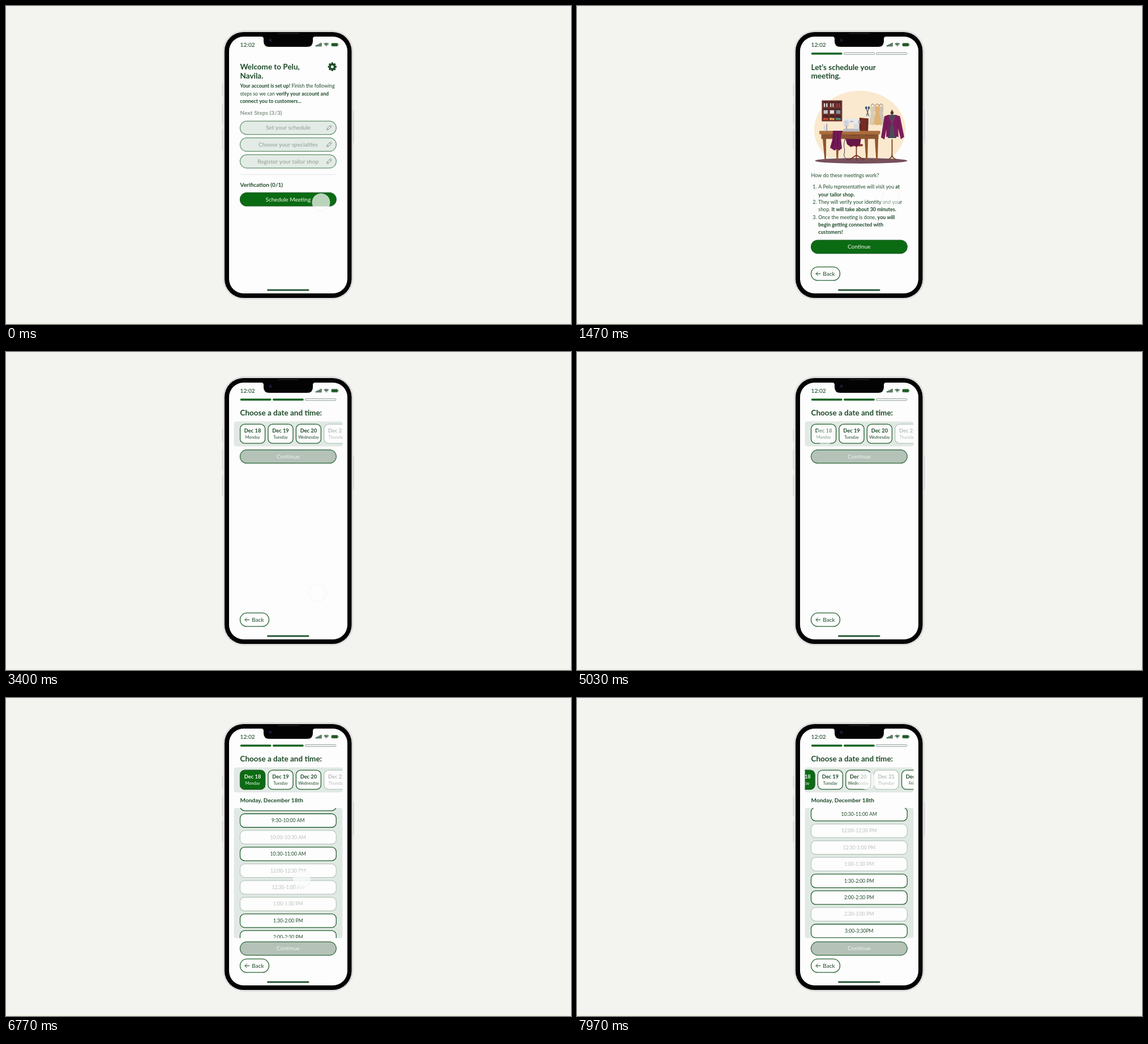
An HTML page with a canvas for the animation above (8000 ms loop, 998 by 561 pixels).

```html
<!DOCTYPE html>
<html lang="en">
<head>
<meta charset="utf-8">
<title>Meeting scheduler</title>
<style>
html, body { margin: 0; width: 100%; height: 100%; overflow: hidden; background: #f3f3f0; }
canvas { display: block; width: 998px; height: 561px; }
</style>
</head>
<body>
<canvas id="stage"></canvas>
<script>
const W = 998, H = 561, LOOP = 8000;
const canvas = document.getElementById('stage');
const ctx = canvas.getContext('2d');
const dpr = window.devicePixelRatio || 1;
canvas.width = W * dpr;
canvas.height = H * dpr;

const INK = '#1d4a28', GREEN = '#0b6b12', EDGE = '#24602f', PANEL = '#e1e9e4', WHITE = '#fdfdfd';
const SCREEN = { x: 394, y: 54, w: 209, h: 453 };

// ---------- timing ----------
const clamp = v => Math.min(1, Math.max(0, v));
const mix = (a, b, p) => a + (b - a) * p;

// cubic-bezier(.42, 0, .58, 1)
function easeInOut(x) {
  if (x <= 0 || x >= 1) return clamp(x);
  let lo = 0, hi = 1, u = 0.5;
  for (let i = 0; i < 20; i++) {
    u = (lo + hi) / 2;
    const bx = 1.26 * u * (1 - u) ** 2 + 1.74 * u * u * (1 - u) + u ** 3;
    if (bx < x) lo = u; else hi = u;
  }
  return u * u * (3 - 2 * u);
}
const phase = (t, from, to) => easeInOut((t - from) / (to - from));

// ---------- drawing helpers ----------
function box(x, y, w, h, r, fill, stroke, line = 1.2) {
  ctx.beginPath();
  ctx.roundRect(x, y, w, h, r);
  if (fill) { ctx.fillStyle = fill; ctx.fill(); }
  if (stroke) { ctx.strokeStyle = stroke; ctx.lineWidth = line; ctx.stroke(); }
}
function oval(x, y, rx, ry, fill) {
  ctx.beginPath();
  ctx.ellipse(x, y, rx, ry, 0, 0, Math.PI * 2);
  ctx.fillStyle = fill;
  ctx.fill();
}
function poly(points, fill) {
  ctx.beginPath();
  for (let i = 0; i < points.length; i += 2) ctx.lineTo(points[i], points[i + 1]);
  ctx.closePath();
  ctx.fillStyle = fill;
  ctx.fill();
}
function stroke(path, color, width) {
  ctx.strokeStyle = color;
  ctx.lineWidth = width;
  ctx.lineCap = ctx.lineJoin = 'round';
  ctx.stroke(new Path2D(path));
}
function faded(alpha, draw) {
  if (alpha <= 0) return;
  ctx.save();
  ctx.globalAlpha *= alpha;
  draw();
  ctx.restore();
}
// y is the optical middle of the line
function text(str, x, y, size, { weight = 400, color = INK, align = 'left' } = {}) {
  ctx.font = `${weight} ${size}px Lato, sans-serif`;
  ctx.textAlign = align;
  ctx.fillStyle = color;
  ctx.fillText(str, x, y + size * 0.34);
}
// asterisks switch bold on and off
function rich(str, x, y, size) {
  str.split('*').forEach((part, i) => {
    text(part, x, y, size, { weight: i % 2 ? 700 : 400 });
    x += ctx.measureText(part).width;
  });
}
const title = (str, y) => text(str, 413.5, y, 13.5, { weight: 700 });
const centered = (str, x, y, size, color, weight = 400) =>
  text(str, x, y, size, { color, weight, align: 'center' });

function button(label, y, kind) {
  const [fill, edge, color] = {
    solid: [GREEN, EDGE, '#f2f7f2'],
    done: ['#e3ebe6', '#5f8f69', '#8b9f91'],
    off: ['#b4c2b8', '#2b6537', '#eef2ef']
  }[kind];
  box(413.5, y - 11.8, 169.8, 23.6, 11.8, fill, edge);
  centered(label, 498.3, y, 10.1, color);
}
function statusBar() {
  text('12:02', 413.5, 68.6, 10.2, { weight: 500 });
  for (let i = 0; i < 4; i++) {
    const h = 2.5 + i * 1.4;
    box(547 + i * 2.8, 71.6 - h, 2, h, 0.5, INK);
  }
  for (let i = 0; i < 3; i++) {
    ctx.beginPath();
    ctx.arc(565.7, 71.2, 0.8 + i * 2.4, -Math.PI * 0.76, -Math.PI * 0.24);
    ctx.strokeStyle = INK;
    ctx.lineWidth = 1.4;
    ctx.stroke();
  }
  box(574.8, 65.4, 11.4, 5.6, 1.6, '#1d5a22', '#7f9a86', 0.7);
  box(587, 67.2, 1, 2, 0.4, '#7f9a86');
}
function screenBase() {
  ctx.fillStyle = WHITE;
  ctx.fillRect(SCREEN.x, SCREEN.y, SCREEN.w, SCREEN.h);
  statusBar();
  box(461, 499.8, 74.5, 2.6, 1.3, '#1d4f2d');
}
function progress(done) {
  for (let i = 0; i < 3; i++) {
    const x = 413.7 + i * 57.2;
    if (i < done) box(x, 82.2, 55, 3.6, 1.8, '#126220');
    else box(x + 0.2, 82.4, 54.6, 3.2, 1.6, WHITE, '#71867a', 0.8);
  }
}
function backButton() {
  box(413.5, 460.4, 51, 23.8, 11.9, WHITE, EDGE, 1.3);
  stroke('M430 472.4H422.2M425.4 469L422 472.4L425.4 475.8', INK, 1);
  text('Back', 434.3, 472.4, 10);
}
function pencil(y) {
  ctx.save();
  ctx.translate(570.5, y);
  ctx.rotate(Math.PI / 4);
  box(-1.6, -5.4, 3.2, 8, 0.8, null, '#7f9787', 0.9);
  stroke('M-1.6 2.6L0 5.4L1.6 2.6M-1.6 -3.2H1.6', '#7f9787', 0.9);
  ctx.restore();
}
function gear(x, y) {
  ctx.save();
  ctx.translate(x, y);
  for (let i = 0; i < 8; i++) {
    box(-1.8, -7.6, 3.6, 4, 0.8, INK);
    ctx.rotate(Math.PI / 4);
  }
  oval(0, 0, 5.7, 5.7, INK);
  oval(0, 0, 2.5, 2.5, WHITE);
  ctx.restore();
}

// ---------- screens ----------
function homeScreen() {
  screenBase();
  title('Welcome to Pelu,', 107.8);
  title('Navila.', 123);
  gear(576.3, 107.2);
  rich('*Your account is set up!* Finish the following', 413.5, 141.2, 8.9);
  rich('steps so we can *verify your account and*', 413.5, 154.6, 8.9);
  rich('*connect you to customers...*', 413.5, 168, 8.9);
  text('Next Steps (3/3)', 413.5, 188.4, 10.2, { weight: 700, color: '#84988a' });
  ['Set your schedule', 'Choose your specialties', 'Register your tailor shop'].forEach((label, i) => {
    const y = 214.9 + i * 29.6;
    button(label, y, 'done');
    pencil(y);
  });
  box(413.5, 296.8, 170, 0.9, 0, '#dfe5e1');
  text('Verification (0/1)', 413.5, 315.2, 10, { weight: 700 });
  button('Schedule Meeting', 341.2, 'solid');
}

function shelf() {
  box(432.4, 166.4, 36, 37, 0.5, '#71352f');
  const goods = ['#d9d2cc', '#c8b8b0', '#a33b45', '#b9c4cb', '#e0dcd6', '#7d8f9c', '#c94a35', '#d9a348', '#4f8b78'];
  goods.forEach((color, i) => {
    const x = 434.6 + (i % 3) * 11.1, y = 168.6 + Math.floor(i / 3) * 11.8;
    box(x, y, 9.6, 9.6, 0, '#4c2326');
    if (i < 3) {
      box(x + 1.2, y + 3, 2.6, 6.6, 0.5, color);
      box(x + 5.4, y + 3, 2.6, 6.6, 0.5, color);
    } else if (i < 6) box(x + 1, y + 3.4, 7.4, 6.2, 0.5, color);
    else { oval(x + 2.7, y + 7, 2.4, 2.4, color); oval(x + 6.9, y + 7.2, 2.2, 2.2, color); }
  });
}
function dress(x, color) {
  stroke(`M${x - 3.5} 175.5L${x} 172.5L${x + 3.5} 175.5`, '#6b4a3a', 0.9);
  poly([x - 3.5, 174, x, 178, x + 3.5, 174, x + 4.6, 183, x + 3.2, 188, x + 7, 208,
    x, 210.5, x - 6.8, 208, x - 3.2, 188, x - 4.6, 183], color);
}
function sewingMachine() {
  box(470.5, 216.4, 29, 5, 1, '#b9bbc4');
  box(489, 200, 9.5, 17, 2, '#dbdce2');
  box(471, 199, 27.5, 9, 3, '#e8e8ed');
  box(471.5, 202, 8.5, 10.5, 1.5, '#d0d2da');
  box(475.4, 212, 1.2, 4.8, 0, '#70747f');
  oval(498.8, 205, 1.8, 3.2, '#9a9da8');
  box(482, 202.5, 6.5, 2.5, 1, '#b9bbc4');
}
function mannequin() {
  stroke('M556.5 184V189M556.5 236V266M550 270.5Q556 268 556.5 262Q557 268 563 270.5', '#7d4f2b', 2);
  oval(556.5, 188.5, 2.7, 3.3, '#54331f');
  poly([549, 192, 564, 192, 566, 214, 564, 233, 549, 233, 547, 214], '#484b57');
  poly([550, 192, 543, 194.5, 537, 232, 543, 235.5, 546.5, 217, 546, 231, 552.5, 230, 553.5, 212, 556, 207, 551, 194], '#761b58');
  poly([563, 192, 570.5, 194.5, 578, 231, 572, 235, 567, 216, 568, 231, 561, 230, 559.5, 212, 557, 207, 562, 194], '#7d1d5d');
  stroke('M547 203L546.5 218M567 203L567 216', '#571340', 0.8);
  stroke('M551 194L556 207L562 194', '#9a3476', 1);
}
function workshop() {
  ctx.beginPath();
  ctx.ellipse(499.5, 218, 80.6, 68.5, 0, Math.PI * 0.74, Math.PI * 2.26);
  ctx.fillStyle = '#fae9ce';
  ctx.fill();
  oval(502, 273, 81.5, 5, '#76505c');
  shelf();
  dress(537, '#cfc3ae');
  dress(522.5, '#d7cdb4');
  dress(530.5, '#e0b277');
  stroke('M511 181L515.5 194M515 181L511.5 194', '#465572', 1.2);
  oval(510.7, 179.5, 1.8, 2.5, '#31506f');
  oval(515.4, 179.5, 1.8, 2.5, '#31506f');
  // stool behind the table
  poly([499, 197, 515, 198.5, 514, 222, 498, 221], '#762c22');
  stroke('M501 198V220M512 200V220', '#541c18', 1);
  box(482, 243.5, 23, 4, 2, '#8c3426');
  stroke('M493.5 247V263M481 271.5L493.5 263L507 271.5M493.5 263V272', '#7a3424', 1.8);
  poly([474, 233, 502, 233, 500, 244, 494, 249, 489, 245, 484, 249, 477, 244], '#651646');
  // table
  const leg = (x, dx) => poly([x, 234, x + 6, 234, x + 4 + dx, 273, x + 1.5 + dx, 273], '#8f5630');
  leg(434, 2);
  leg(457, 0);
  leg(508, 1);
  leg(526, 1);
  box(431.5, 226, 101, 8.5, 0.5, '#8b5431');
  box(428, 220.3, 107.5, 6, 1, '#aa6d3d');
  stroke('M482 228.5H498M510 228.5H525', '#6d3c20', 0.8);
  box(435.8, 211, 2.6, 9.5, 0.8, '#d5d7df');
  box(440.5, 207.5, 1.4, 13, 0.4, '#7d899d');
  sewingMachine();
  poly([452, 220, 469, 220, 466, 232, 468, 251, 463, 255, 459, 252, 455, 255, 447, 250, 451, 236], '#731a55');
  stroke('M455 224L452 250M461 223L460 250', '#4f0f39', 0.9);
  stroke('M474 234C468 250 475 250 472 260Q470 268 479 271', '#342a35', 0.9);
  mannequin();
}
function meetingScreen() {
  screenBase();
  progress(1);
  title('Let’s schedule your', 108.2);
  title('meeting.', 123.6);
  workshop();
  text('How do these meetings work?', 413.5, 299.2, 9);
  [
    'A Pelu representative will visit you *at*',
    '*your tailor shop.*',
    'They will verify your identity and your',
    'shop. *It will take about 30 minutes.*',
    'Once the meeting is done, *you will*',
    '*begin getting connected with*',
    '*customers!*'
  ].forEach((line, i) => rich(line, 426.3, 319.2 + i * 13.36, 8.9));
  [0, 2, 4].forEach((row, i) => text(`${i + 1}.`, 416.3, 319.2 + row * 13.36, 8.9));
  button('Continue', 424.8, 'solid');
  backButton();
}

const DAYS = ['Monday', 'Tuesday', 'Wednesday', 'Thursday', 'Friday', 'Saturday'];
const SLOTS = ['9:00-9:30 AM', '9:30-10:00 AM', '10:00-10:30 AM', '10:30-11:00 AM', '12:00-12:30 PM',
  '12:30-1:00 PM', '1:00-1:30 PM', '1:30-2:00 PM', '2:00-2:30 PM', '2:30-3:00 PM', '3:00-3:30PM', '3:30-4:00 PM'];
const TAKEN = [2, 4, 5, 6, 9];

function panel(y, h, draw) {
  ctx.save();
  box(402.6, y, 191.8, h, 4, PANEL);
  ctx.clip();
  draw();
  ctx.restore();
}
function dayCard(i, x, selected) {
  const off = i === 3, color = selected ? '#f4f8f4' : off ? '#b4beb7' : INK;
  box(x, 127.4, 44, 33.8, 8, selected ? GREEN : WHITE, off ? '#b3c6b8' : EDGE, 1.3);
  centered(`Dec ${18 + i}`, x + 22, 139.3, 9.3, color, 700);
  centered(DAYS[i], x + 22, 150.4, 7.1, color);
}
function dateScreen({ picked, listShift, daysShift }) {
  screenBase();
  progress(2);
  title('Choose a date and time:', 107.8);
  panel(122.4, 44, () => {
    DAYS.forEach((_, i) => dayCard(i, 413.6 + i * 49.4 - daysShift, false));
    faded(picked, () => dayCard(0, 413.6 - daysShift, true));
  });
  faded(picked, () => {
    text('Monday, December 18th', 413.5, 180.4, 10.1, { weight: 700 });
    panel(194, 229.4, () => SLOTS.forEach((slot, i) => {
      const y = 216.2 + i * 29.45 - listShift, off = TAKEN.includes(i);
      box(413.5, y - 12, 169.8, 24, 8, WHITE, off ? '#b9cabe' : EDGE, 1.3);
      centered(slot, 498.3, y, 8.6, off ? '#b9c0bb' : INK);
    }));
  });
  button('Continue', mix(184.4, 442, picked), 'off');
  backButton();
}

// ---------- stage ----------
function push(from, to, p) {
  const { x, y, w, h } = SCREEN;
  ctx.save();
  ctx.translate(-w * 0.25 * p, 0);
  from();
  ctx.restore();
  ctx.fillStyle = `rgba(0,0,0,${0.45 * p})`;
  ctx.fillRect(x, y, w, h);
  ctx.save();
  ctx.translate(w * (1 - p), 0);
  to();
  ctx.restore();
}
function phoneBody() {
  const rim = '#e3dfe1';
  [[137, 21], [172, 36], [217, 37]].forEach(([y, h]) => box(381.3, y, 4, h, 1, rim));
  box(611, 184, 4, 58, 1, rim);
  box(383.8, 43.8, 229, 473.2, 36, rim, '#d3cecf', 0.8);
  box(386, 46, 224.5, 469, 33.5, '#030303');
}
function notch() {
  ctx.fillStyle = '#030303';
  ctx.fill(new Path2D('M451 53V54Q455 54 455 58V62Q455 72 465 72H532Q542 72 542 62V58Q542 54 546 54V53Z'));
  oval(467, 60.5, 3.2, 3.2, '#10111f');
  oval(467, 60.5, 1.3, 1.3, '#20234a');
  box(480, 47.6, 38, 1.8, 0.9, '#1c1c1c');
}

// from, to, x, y
const MOVES = [
  [880, 1470, 554, 339.5],
  [1830, 2630, 550.5, 424.4],
  [3970, 4770, 438, 147.6],
  [5630, 6430, 522.5, 349.2],
  [6470, 7270, 522.5, 249.5],
  [7300, 8100, 511, 140]
];
// press, release
const CLICKS = [[730, 1830], [2670, 3670], [4800, 5630]];

function cursor(t) {
  let x = 556.5, y = 346.4, press = 0;
  for (const [from, to, tx, ty] of MOVES) {
    const p = phase(t, from, to);
    x = mix(x, tx, p);
    y = mix(y, ty, p);
  }
  for (const [down, up] of CLICKS) press += phase(t, down, down + 150) - phase(t, up, up + 150);
  ctx.beginPath();
  ctx.arc(x, y, 15.4, 0, Math.PI * 2);
  ctx.fillStyle = `rgba(253,253,253,${0.72 - 0.28 * press})`;
  ctx.fill();
  ctx.strokeStyle = 'rgba(238,240,240,.6)';
  ctx.lineWidth = 1.2;
  ctx.stroke();
}

function draw(t) {
  ctx.setTransform(dpr, 0, 0, dpr, 0, 0);
  ctx.fillStyle = '#f3f3f0';
  ctx.fillRect(0, 0, W, H);
  ctx.fillStyle = '#e3f1d6';
  ctx.fillRect(0, 560, W, 1);
  phoneBody();

  const dates = () => dateScreen({
    picked: phase(t, 5050, 5600),
    listShift: 99.7 * phase(t, 6470, 7270),
    daysShift: 39.7 * phase(t, 7300, 8100)
  });
  const toMeeting = phase(t, 880, 1470), toDates = phase(t, 2824, 3400);

  ctx.save();
  ctx.beginPath();
  ctx.roundRect(SCREEN.x, SCREEN.y, SCREEN.w, SCREEN.h, 25.5);
  ctx.clip();
  if (toMeeting === 0) homeScreen();
  else if (toMeeting < 1) push(homeScreen, meetingScreen, toMeeting);
  else if (toDates === 0) meetingScreen();
  else if (toDates < 1) push(meetingScreen, dates, toDates);
  else dates();
  cursor(t);
  ctx.restore();
  notch();
}

const start = performance.now();
function tick() {
  draw((performance.now() - start) % LOOP);
  requestAnimationFrame(tick);
}
tick();
</script>
</body>
</html>
```
